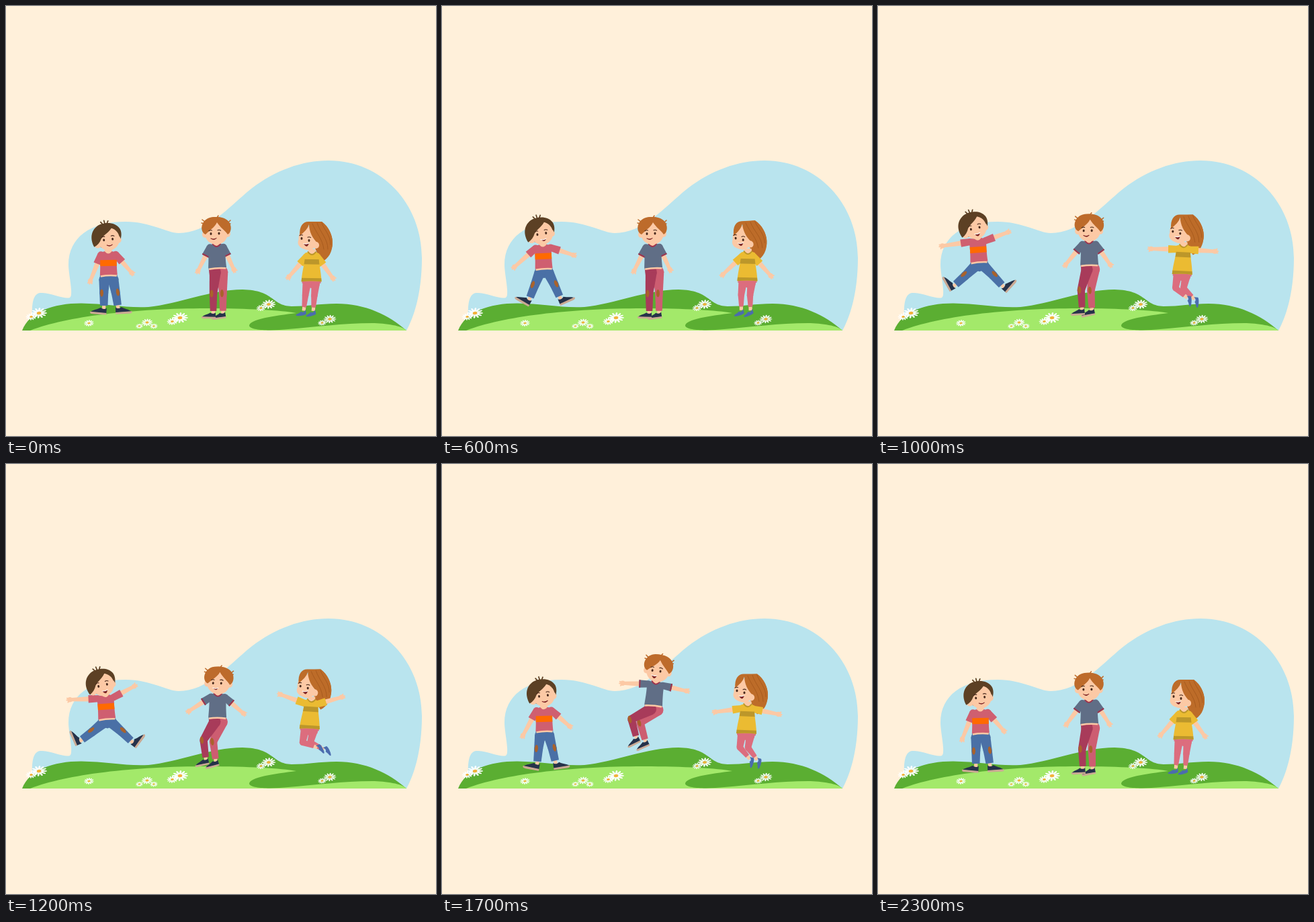
An HTML page with a canvas for the animation above (2400 ms loop, 640x640 px).

```html
<!DOCTYPE html>
<html lang="en">
<head>
<meta charset="utf-8">
<title>Children jumping on a meadow</title>
<style>
html, body { margin: 0; width: 100%; height: 100%; overflow: hidden; background: #fff0da; }
canvas { display: block; width: 640px; height: 640px; }
</style>
</head>
<body>
<canvas id="stage"></canvas>
<script>
const LOOP = 2400, STEP = 100, SKIN = '#fcc9a5', INK = '#47291c';
const canvas = document.getElementById('stage');
const ctx = canvas.getContext('2d');
const ratio = window.devicePixelRatio || 1;
canvas.width = canvas.height = 640 * ratio;

// Drawing helpers
function fill(d, color) {
  ctx.fillStyle = color;
  ctx.fill(new Path2D(d));
}
function line(d, color, width, cap = 'round') {
  ctx.strokeStyle = color;
  ctx.lineWidth = width;
  ctx.lineCap = cap;
  ctx.stroke(new Path2D(d));
}
function oval(x, y, rx, ry, color, turn = 0) {
  ctx.fillStyle = color;
  ctx.beginPath();
  ctx.ellipse(x, y, rx, ry, turn, 0, 7);
  ctx.fill();
}
function placed(x, y, deg, draw, sx = 1, sy = 1) {
  ctx.save();
  ctx.translate(x, y);
  ctx.rotate(deg * Math.PI / 180);
  ctx.scale(sx, sy);
  draw();
  ctx.restore();
}

// Motion helpers
function ease(u) {
  u = Math.min(1, Math.max(0, u));
  return u * u * (3 - 2 * u);
}
const mix = ([from, to], p) => from + (to - from) * p;
function polar([x, y], deg, dist) {
  const a = deg * Math.PI / 180;
  return [x + Math.cos(a) * dist, y + Math.sin(a) * dist];
}
function jump({ start, peak, end }, t) {
  return t < peak ? ease((t - start) / (peak - start)) : 1 - ease((t - peak) / (end - peak));
}

// Scenery
function daisy(x, y, r) {
  placed(x, y, -5, () => {
    for (let k = 0; k < 12; k++) {
      placed(0, 0, k * 30 + 8, () => oval(0.62, 0, 0.39, 0.125, '#fff'));
    }
    oval(0, 0, 0.27, 0.27, '#f3b23b');
  }, r, r * 0.65);
}
function daisyPair(x, y, r) {
  daisy(x, y, r);
  daisy(x - 11.5, y + 5.5, r * 0.68);
}
function scenery() {
  ctx.fillStyle = '#fff0da';
  ctx.fillRect(0, 0, 640, 640);
  fill('M39 460C38 432 45 426 54 427C70 428 88 437 95 434C101 431 93 400 93 385C93 345 125 321 178 321C215 321 240 338 257 338C300 338 330 300 365 272C400 245 440 230 480 230C560 230 619 295 619 375C619 430 606 465 596 483H39Z', '#b9e4ee');
  fill('M24 483C35 455 70 442.5 112 442.5C150 443 180 450 212 448C255 444 305 422 352 422C400 423 395 446 425 447C450 447 465 443 492 443C535 443 570 460 596 483Z', '#5bae32');
  fill('M36 483C90 462 190 450 300 450C360 450 410 453 432 457C400 461 362 466 362 476C365 484 400 483 420 481C460 478 500 472 545 472C565 472 590 476 596 483Z', '#a3e96a');
  daisyPair(49, 457, 12);
  daisyPair(259, 464, 12);
  daisyPair(391, 444, 10.5);
  daisyPair(482, 466, 9.5);
  daisyPair(210, 471, 8.5);
  daisy(220, 476.5, 6);
  daisy(123.5, 472, 7.5);
}

// Heads, drawn around the middle of the face
function face(x1, y1, x2, y2, mx, my, open) {
  oval(x1, y1, 1.5, 1.9, INK);
  oval(x2, y2, 1.5, 1.9, INK);
  line(`M${x1 - 3} ${y1 - 4.3}q2 -1.6 4.4 -.6M${x2 - 2} ${y2 - 4.8}q2.4 -1.2 4.6 .4`, INK, 1.1);
  const lip = `M${mx - 4} ${my - 1}Q${mx} ${my + 1.4 - open} ${mx + 4} ${my - 1.4}`;
  fill(`${lip}Q${mx + 1} ${my + 2.2 + open * 5.6} ${mx - 4} ${my - 1}Z`, '#7c2323');
  line(lip, open > 0.4 ? '#fff' : '#7c2323', 1.1);
}
function darkHead(open) {
  const hair = '#5c4024';
  oval(-1, -3, 20.5, 18.5, hair);
  oval(-14.5, 10, 5, 4.6, SKIN);
  oval(17, 4, 4, 4.8, SKIN);
  oval(2, 2, 16.5, 16.8, SKIN);
  fill('M9 -17C5 -8 -5 -5 -9 1C-11 6 -15 10 -20 12.5C-25 2 -25 -12 -12 -19.5C-2 -24 14 -23 20 -12C22 -8 22 -2 20 3C18 -5 15 -12 9 -17Z', hair);
  line('M-5 -20L-8 -24M-2 -21L-3 -26M1 -21L3 -25', hair, 1.7);
  face(-5, 3, 8, 2.5, 3, 12, open);
}
function gingerHead(open) {
  const hair = '#bd6b2b';
  oval(0, -5, 20.5, 18, hair);
  oval(-17, 3, 4, 4.8, SKIN);
  oval(17, 2, 4, 4.8, SKIN);
  oval(0, 1.5, 17, 16.5, SKIN);
  fill('M1 -15C-2 -8 -9 -4 -16 3C-27 -2 -22 -24 -2 -23C24 -25 26 -2 17 3C13 -3 6 -7 1 -15Z', hair);
  line('M-17 -16L-21 -19M-18 -13L-22 -14M18 -15L21 -18M18 -13L21 -13M1 -22L3 -25', hair, 1.5);
  face(-8, 2, 4, 1.5, -4, 10, open);
}
function longHairBack() {
  fill('M2 -24L20 -25C30 -18 36 -5 36 6C36 20 30 30 20 35C16 30 10 15 8 8Z', '#bd6c29');
}
function longHairHead(open) {
  const hair = '#bd6c29', dark = '#a2571c';
  oval(0, 0, 14.5, 17.5, SKIN);
  oval(-1, 6, 14.5, 10.5, SKIN);
  fill('M-12.5 -4C-14 -18 -8 -25 0 -25L20 -25C30 -18 36 -5 36 6C36 11 35 14 34 16L17 17L14 7C6 0 1 -11 1 -21C-1 -14 -6 -10 -12.5 -4Z', hair);
  line('M6 -22C12 -7 21 0 23 16M13 -23C18 -8 29 0 29 16M20 -23C24 -12 33 -5 33 9', dark, 0.8);
  oval(11.5, 10, 4.6, 5, SKIN);
  face(-10, 0, 1, 3, -3, 8.5, open);
}

// Shoes with the toe towards +x
function sneaker() {
  fill('M-4 -2C-1 1 3 0 5 -2C9 1 16 2 19.4 5.4L-4 6.2Z', '#26324a');
  fill('M-4.2 5.6L20 5C21 7.4 19 8.4 16 8.4H-4Z', '#cba993');
}
function flatShoe() {
  fill('M-3 -1C0 3 3 2 4 .5C7 3 12 3 12.6 5C11 7.6 -2 7 -3 5Z', '#4b6cae');
}

// Body parts
function taper(a, b, wa, wb, color) {
  const len = Math.hypot(b[0] - a[0], b[1] - a[1]);
  const nx = (a[1] - b[1]) / len / 2, ny = (b[0] - a[0]) / len / 2;
  fill(`M${a[0] + nx * wa} ${a[1] + ny * wa}L${b[0] + nx * wb} ${b[1] + ny * wb}L${b[0] - nx * wb} ${b[1] - ny * wb}L${a[0] - nx * wa} ${a[1] - ny * wa}Z`, color);
}
function drawLeg(kid, limb, hip, q) {
  const thigh = mix(limb.thigh, q), shin = mix(limb.shin, q);
  const knee = polar(hip, thigh, kid.thigh), ankle = polar(knee, shin, kid.shin);
  const foot = polar(ankle, shin, kid.sock);
  const [hipWidth, kneeWidth, hemWidth] = kid.legWidth;
  line(`M${ankle}L${foot}`, SKIN, 5.2, 'butt');
  placed(...foot, mix(limb.foot, q), kid.shoe, limb.toe * kid.shoeSize, kid.shoeSize);
  oval(...hip, hipWidth / 2, hipWidth / 2, limb.pants);
  taper(hip, knee, hipWidth, kneeWidth, limb.pants);
  oval(...knee, kneeWidth / 2, kneeWidth / 2, limb.pants);
  taper(knee, ankle, kneeWidth, hemWidth, limb.pants);
  if (limb.patch) {
    oval(...polar(knee, shin + 90, limb.patch), 5.6, 2.5, '#a9622b', shin * Math.PI / 180);
  }
}
function drawArm(kid, limb, shoulder, q) {
  const aim = mix(limb.arm, q);
  const hand = polar(shoulder, aim, limb.reach);
  const cuff = polar(shoulder, aim, 14.5);
  taper(shoulder, hand, 8.5, 5, SKIN);
  oval(...hand, 3.7, 3.7, SKIN);
  for (const spread of [-52, -6, 28]) line(`M${hand}L${polar(hand, aim + spread, 4.7)}`, SKIN, 2);
  oval(...shoulder, 5, 5, kid.shirt);
  taper(shoulder, cuff, 10, 11.5, kid.shirt);
  if (kid.trim) taper(polar(shoulder, aim, 12.5), cuff, 11.3, 11.5, kid.trim);
}
function drawTorso(kid) {
  const [top, bottom, shoulder, hem] = kid.torso;
  fill(`M${-hem + 1} ${bottom - 3}H${hem - 1}V${bottom + 2.5}Q0 ${bottom + 1} ${-hem + 1} ${bottom + 3}Z`, kid.belly);
  const shape = `M${-shoulder} ${top + 2}L-5 ${top}H5L${shoulder} ${top + 2}C${shoulder - 1} -6 ${hem - 1} 4 ${hem} ${bottom}Q0 ${bottom - 1.5} ${-hem} ${bottom + 0.5}C${-hem + 1} 4 ${-shoulder + 1} -6 ${-shoulder} ${top + 2}Z`;
  fill(shape, kid.shirt);
  ctx.save();
  ctx.clip(new Path2D(shape));
  ctx.fillStyle = kid.stripe;
  for (const [y, height] of kid.bands) ctx.fillRect(-20, y, 40, height);
  ctx.restore();
  fill(`M-5.5 ${top - 4}H5.5V${top}Q0 ${top + 7} -5.5 ${top}Z`, SKIN);
  if (kid.trim || kid.collar) line(`M-5.8 ${top}Q0 ${top + 8} 5.8 ${top}`, kid.trim || kid.collar, 1.8);
}

// Every pair holds a value for [standing, top of the jump]; angles are in degrees
const darkBoy = {
  time: { start: 50, peak: 1200, end: 1860 }, lag: 1.2, nod: 0,
  body: { x: [152.5, 149], y: [383, 361.5], turn: [-1, -4] },
  head: { x: [150.5, 142], y: [345, 327], turn: [-4, -12], open: [0.1, 1], draw: darkHead },
  shirt: '#cf5f70', stripe: '#ff6a00', bands: [[-5, 9]], belly: SKIN,
  torso: [-18, 17.5, 13, 13], shoulder: [11, -13], hipY: 24,
  thigh: 20, shin: 19, sock: 5, legWidth: [16, 13, 11.5], shoe: sneaker, shoeSize: 1,
  left: { arm: [112, 178], reach: 42, hipX: -6.5, thigh: [92, 141], shin: [90, 143], foot: [4, 66], toe: -1, pants: '#4a70a6', patch: 3.2 },
  right: { arm: [49, -28], reach: 36, hipX: 6.5, thigh: [79, 42], shin: [81, 44], foot: [-3, -53], toe: 1, pants: '#4a70a6', patch: -3.2 }
};
const gingerBoy = {
  time: { start: 760, peak: 1780, end: 2430 }, lag: 0.85, nod: 0,
  body: { x: [314, 316.5], y: [372, 341], turn: [-2, 6] },
  head: { x: [313, 321.5], y: [337, 306], turn: [0, 10], open: [0.15, 1], draw: gingerHead },
  shirt: '#606e86', trim: '#a0334c', bands: [], belly: SKIN,
  torso: [-18, 17.5, 13, 13.5], shoulder: [10, -13], hipY: 24,
  thigh: 32, shin: 26, sock: 4, legWidth: [17, 11.5, 9.5], shoe: sneaker, shoeSize: 0.87,
  left: { arm: [117, 183], reach: 39, hipX: -3.5, thigh: [95, 154], shin: [90, 75], foot: [0, -28], toe: -1, pants: '#a83b5a', patch: 2.5 },
  right: { arm: [65, 12], reach: 37, hipX: 7, thigh: [88, 145], shin: [90, 74], foot: [-9, -25], toe: -1, pants: '#cd5d71', patch: 1.5 }
};
const girl = {
  time: { start: 480, peak: 1400, end: 1990 }, lag: 0.85, nod: 4,
  body: { x: [455, 453], y: [388, 370], turn: [1, 4] },
  head: { x: [450, 448], y: [346, 328.5], turn: [0, 0], open: [1, 1], draw: longHairHead, back: longHairBack },
  shirt: '#ebbb32', stripe: '#bc972a', collar: '#bc972a', bands: [[-11, 7.5], [17, 8]], belly: '#dc6d7e',
  torso: [-22, 22, 10.5, 15], shoulder: [8, -15], hipY: 22,
  thigh: 21, shin: 17.5, sock: 5.5, legWidth: [13, 9.5, 6.5], shoe: flatShoe, shoeSize: 1,
  left: { arm: [131, 208], reach: 40, hipX: -6.5, thigh: [97, 101], shin: [96, 10], foot: [-8, -130], toe: -1, pants: '#dc6d7e' },
  right: { arm: [54, -24], reach: 39, hipX: 6.5, thigh: [96, 106], shin: [94, 18], foot: [-14, -126], toe: -1, pants: '#dc6d7e' }
};

function drawKid(kid, t) {
  const { body, head, left, right } = kid;
  const p = jump(kid.time, t), q = p ** kid.lag;
  const x = mix(body.x, p), y = mix(body.y, p), turn = mix(body.turn, p);
  const joint = (dx, dy) => polar(polar([x, y], turn, dx), turn + 90, dy);
  const nod = Math.sin(Math.PI * Math.min(1, t / 800)) * kid.nod;
  const skull = [mix(head.x, p) - nod, mix(head.y, p), mix(head.turn, p) - nod];
  const [shoulderX, shoulderY] = kid.shoulder;
  if (head.back) placed(...skull, head.back);
  placed(x, y, turn, () => fill('M-13 18H13L12 28L0 32L-12 28Z', left.pants));
  for (const limb of [right, left]) drawLeg(kid, limb, joint(limb.hipX, kid.hipY), q);
  drawArm(kid, left, joint(-shoulderX, shoulderY), q);
  drawArm(kid, right, joint(shoulderX, shoulderY), q);
  placed(x, y, turn, () => drawTorso(kid));
  placed(...skull, () => head.draw(mix(head.open, p)));
}

const begin = performance.now();
function render() {
  const elapsed = performance.now() - begin;
  const t = Math.floor(elapsed % LOOP / STEP) * STEP;
  ctx.setTransform(ratio, 0, 0, ratio, 0, 0);
  scenery();
  [darkBoy, gingerBoy, girl].forEach(kid => drawKid(kid, t));
  requestAnimationFrame(render);
}
render();
</script>
</body>
</html>
```
